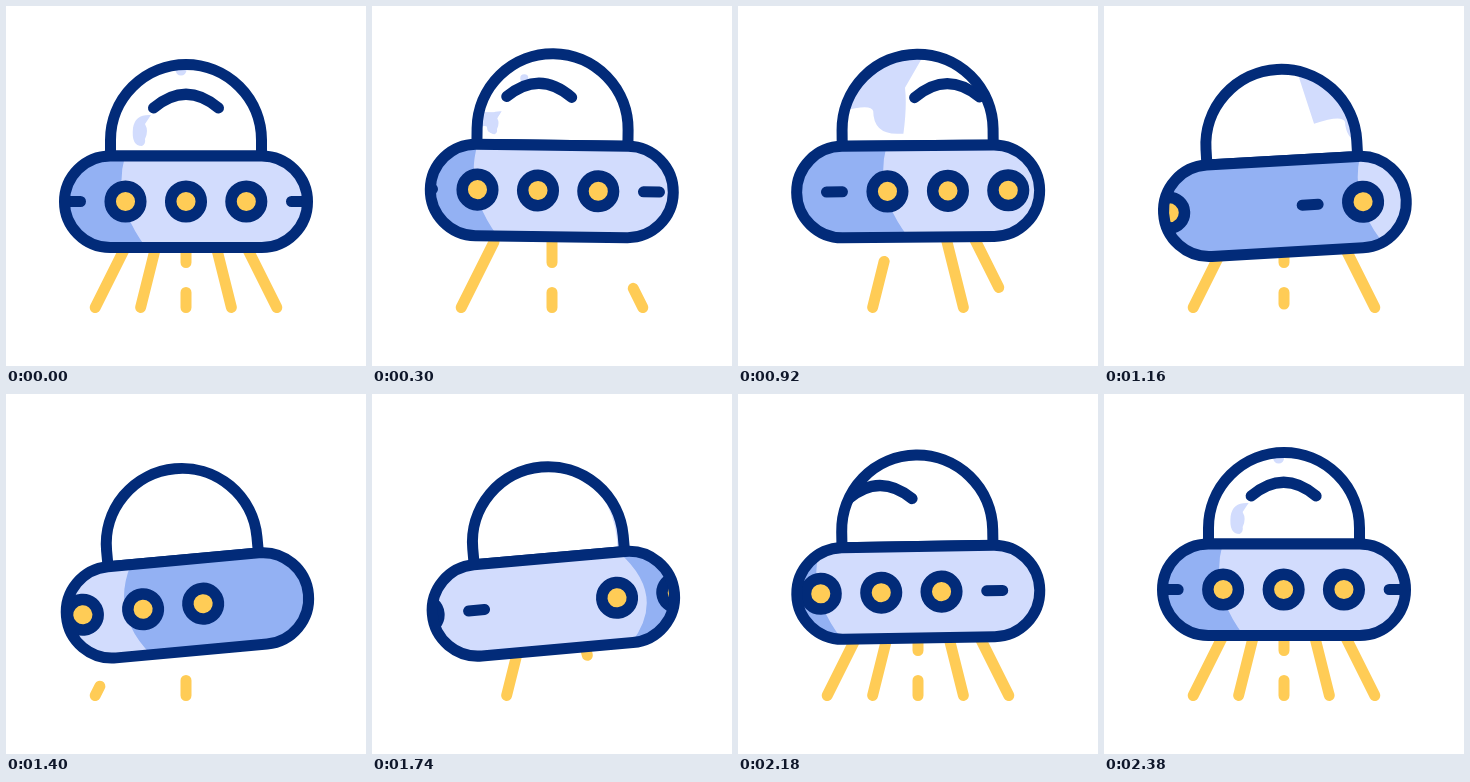
An HTML page for the animation above (2400 ms loop, 360 by 360 pixels).

```html
<!DOCTYPE html>
<html lang="en">
<head>
<meta charset="utf-8">
<title>Flying saucer</title>
<style>
html, body { margin: 0; width: 100%; height: 100%; overflow: hidden; background: #fff; }
svg { display: block; width: 100vw; height: 100vh; }
.line { fill: none; stroke: #022b79; stroke-width: 11; stroke-linecap: round; }
.beam { fill: none; stroke: #ffcc56; stroke-width: 11; stroke-linecap: round; }
.light { fill: #d2dcfd; }
.shade { fill: #93b1f3; }
.port { fill: #ffcc56; stroke: #022b79; stroke-width: 11.5; }
</style>
</head>
<body>
<svg viewBox="0 0 360 360">
  <defs>
    <path id="dome" d="M104.5 150V134a75.5 75.5 0 0 1 151 0V150Z"/>
    <rect id="hull" x="58.5" y="150" width="243" height="91.5" rx="45.75"/>
    <clipPath id="domeClip"><use href="#dome"/></clipPath>
    <clipPath id="hullClip"><use href="#hull"/></clipPath>
    <circle id="port" class="port" cy="195.5" r="15.3"/>
    <g id="ports">
      <use href="#port" x="119.5"/><use href="#port" x="180"/><use href="#port" x="240.3"/>
    </g>
    <g id="panel">
      <path class="line" d="M58.5 195.5h16M285.5 195.5h16"/>
      <use href="#ports"/>
    </g>
    <path id="arc" class="line" d="M147.5 102Q180 74.5 212.5 102"/>
    <g id="spots" class="light">
      <path d="M145 109Q129 108 127 122Q125 140 136 140Q140 138 139 133Q143 125 139 118Z"/>
      <circle cx="175" cy="64" r="5.5"/>
    </g>
  </defs>
  <g id="beams"></g>
  <g id="ship">
    <use href="#dome" fill="#fff"/>
    <g clip-path="url(#domeClip)">
      <g class="roll">
        <use id="fading" href="#spots"/>
        <path id="growing" class="light" d="M158 58H60L75 115Q104 107 106 115Q106 138 130 138H136Q140 110 138 92Z"/>
        <path class="light" d="M-225 60Q-186 100 -191 150H-165V60Z"/>
        <use href="#arc"/>
      </g>
      <g class="roll" data-lag="630">
        <use href="#spots"/>
        <use href="#arc"/>
      </g>
    </g>
    <use href="#dome" class="line"/>
    <use href="#hull" class="light"/>
    <g clip-path="url(#hullClip)">
      <g class="roll">
        <path id="shade" class="shade"/>
        <use href="#panel"/>
      </g>
      <g class="roll" data-lag="315"><use href="#ports"/></g>
      <g class="roll" data-lag="630">
        <path class="shade" d="M-100 150H119Q106 197 140 241.5H-100Z"/>
        <use href="#panel"/>
      </g>
    </g>
    <use href="#hull" class="line"/>
  </g>
</svg>
<script>
const LOOP = 2400, TOP = 228, FOOT = 301.5, SHOT = 150;
const $ = id => document.getElementById(id);
const clamp = x => Math.min(1, Math.max(0, x));
const smooth = x => x * x * (3 - 2 * x);
const mix = (a, b, k) => a + (b - a) * k;

// Smooth curve through [time, value] keys, flat at the ends and turning points.
function track(keys) {
  const rate = i => (keys[i + 1][1] - keys[i][1]) / (keys[i + 1][0] - keys[i][0]);
  const speed = keys.map(([t], i) => {
    if (!i || i === keys.length - 1 || rate(i - 1) * rate(i) <= 0) return 0;
    return mix(rate(i - 1), rate(i), (t - keys[i - 1][0]) / (keys[i + 1][0] - keys[i - 1][0]));
  });
  return t => {
    let i = 0;
    while (i < keys.length - 2 && t > keys[i + 1][0]) i++;
    const [t0, a] = keys[i], [t1, b] = keys[i + 1];
    const d = t1 - t0, x = (t - t0) / d;
    return mix(a, b, smooth(x)) + d * x * (1 - x) * (speed[i] * (1 - x) - speed[i + 1] * x);
  };
}

const lift = track([[0, 0], [600, -21.6], [1500, 17], [LOOP, 0]]);
const tilt = track([[0, 0], [600, 1.5], [1500, -5.5], [1600, -5.5], [LOOP, 0]]);
const spin = track([[0, 0], [600, -27.5], [920, 29.5], [1400, 270], [1740, 439], [2000, 535], [LOOP, 630]]);

// Beams in firing order, numbered by place from the middle one.
const beams = [-1, 1, 2, -2, 0].map((place, i) => {
  const el = document.createElementNS("http://www.w3.org/2000/svg", "path");
  el.setAttribute("class", "beam");
  $("beams").append(el);
  return {
    el, place,
    parts: place ? [[TOP, FOOT]] : [[TOP, 256.5], [286.5, FOOT]],
    shots: [[-LOOP, 95 * i], [606 + 103 * i, 865 + 135 * i], [1570 + 103 * i, 2 * LOOP]]
  };
});

function drawBeam({ el, place, parts, shots }, t) {
  const reach = start => mix(TOP, FOOT, clamp((t - start) / SHOT));
  const at = y => `${180 + place * (45.4 + (y - FOOT) / 4)} ${y}`;
  let d = "";
  for (const [on, off] of shots)
    for (const [from, to] of parts) {
      const y0 = Math.max(from, reach(off)), y1 = Math.min(to, reach(on));
      if (y1 > y0) d += `M${at(y0)}L${at(y1)}`;
    }
  el.setAttribute("d", d);
}

function scale(id, k) {
  $(id).setAttribute("transform", `translate(136 139) scale(${k}) translate(-136 -139)`);
}

function draw(t) {
  const p = spin(t);
  $("ship").setAttribute("transform", `translate(0 ${lift(t)}) rotate(${tilt(t)} 180 180)`);
  for (const g of document.querySelectorAll(".roll"))
    g.setAttribute("transform", `translate(${p - (g.dataset.lag || 0)} 0)`);

  const grown = smooth(clamp(t / 900));
  scale("growing", grown);
  scale("fading", 1 - grown);

  // The trailing edge of the shadow bends over as it crosses the hull.
  const bend = clamp((p - 270) / 168);
  $("shade").setAttribute("d", `M119 150Q106 197 140 241.5H${mix(-131, -185, bend)}` +
    `Q${mix(-168, -145, bend)} 197 ${mix(-143, -190, bend)} 150Z`);

  beams.forEach(b => drawBeam(b, t));
}

function tick() {
  draw(performance.now() % LOOP);
  requestAnimationFrame(tick);
}
tick();
</script>
</body>
</html>
```
